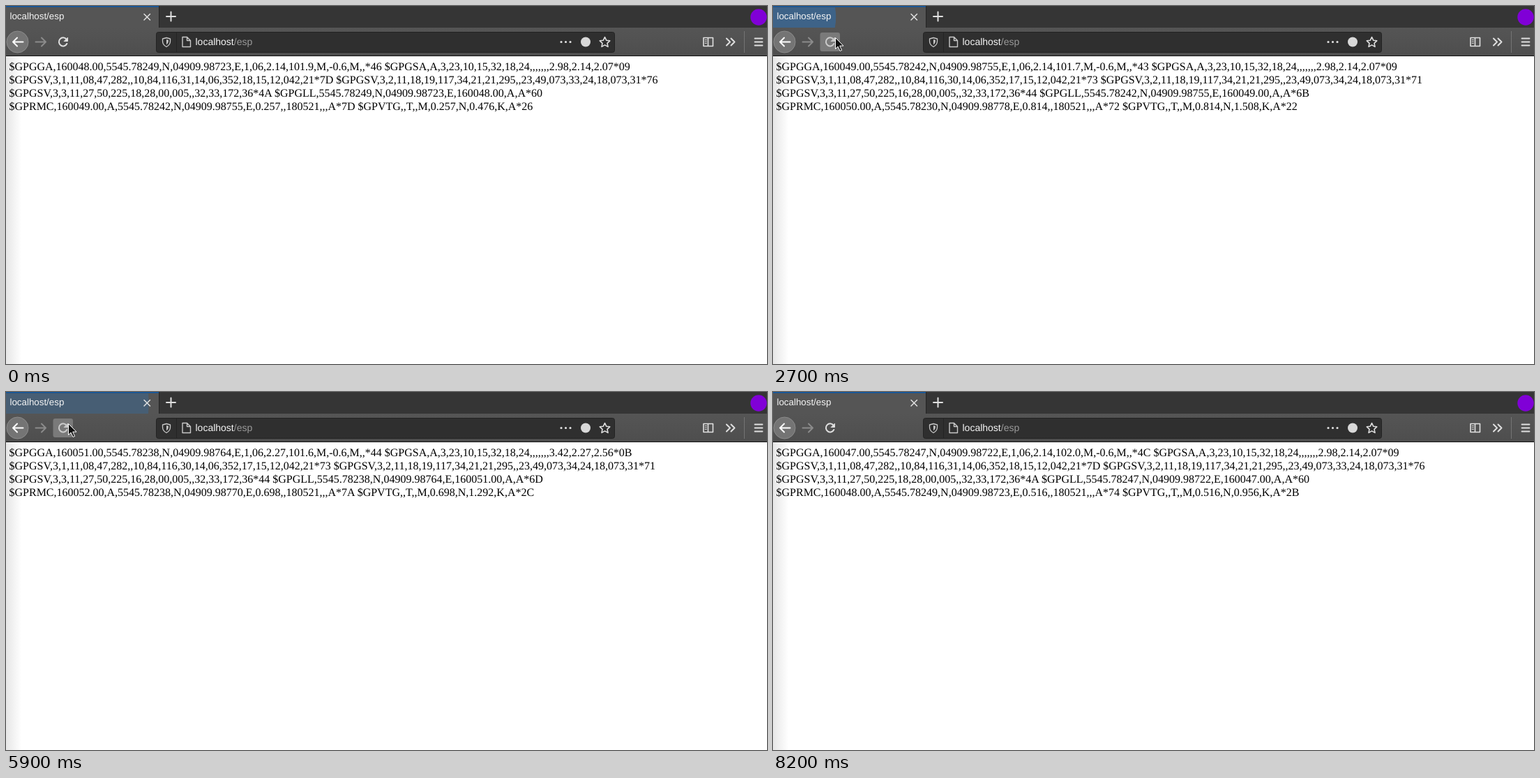
An HTML page for the animation above (8600 ms loop, 1091 by 513 pixels).

```html
<!DOCTYPE html>
<html lang="en">
<head>
<meta charset="utf-8">
<title>localhost/esp</title>
<style>
html, body { margin: 0; width: 100%; height: 100%; overflow: hidden; background: #fff; }
svg { display: block; width: 1091px; height: 513px; }
text { text-rendering: geometricPrecision; }
.ui { font-family: "Liberation Sans", Arial, sans-serif; fill: #f5f5f5; }
.page { font: 16px "Liberation Serif", "Times New Roman", serif; fill: #000; }
.icon { fill: none; stroke: #e0e0e0; stroke-width: 1.6; stroke-linecap: round; stroke-linejoin: round; }
</style>
</head>
<body>
<svg viewBox="0 0 1091 513">
  <defs>
    <linearGradient id="shade"><stop stop-color="#e6e6e6"/><stop offset="1" stop-color="#fff"/></linearGradient>
    <linearGradient id="bar" x2="0" y2="1"><stop stop-color="#555"/><stop offset="1" stop-color="#4e4e4e"/></linearGradient>
    <clipPath id="tab"><path d="M0 2H219V31H0z"/></clipPath>
  </defs>

  <!-- tab strip -->
  <path fill="#353535" d="M0 0H1091V31H0z"/>
  <path fill="#555" d="M0 0H219V31H0z"/>
  <path fill="#0a57a5" d="M0 0H219V1.5H0z"/>
  <path fill="#242424" d="M219 0h1v31h-1z"/>
  <circle id="burst" cx="14" cy="16" fill="#0a84ff" clip-path="url(#tab)"/>
  <text class="ui" x="5.5" y="19" font-size="13.33">localhost/esp</text>
  <circle cx="1079" cy="16" r="11.7" fill="#8000d7"/>

  <!-- toolbar -->
  <path fill="url(#bar)" d="M0 31H1091V71H0z"/>
  <path fill="#111" d="M0 71H1091V72H0z"/>
  <rect x="215.5" y="37.5" width="657" height="29" rx="3" fill="#2f2f2f" stroke="#232323"/>
  <path fill="#232323" d="M244 38h1v28h-1z"/>
  <text class="ui" x="271.5" y="56" font-size="14">localhost<tspan fill="#999">/esp</tspan></text>
  <rect id="button" x="67.5" y="38" width="28.5" height="27" rx="3"/>
  <circle cx="16.5" cy="51.5" r="15.5" fill="#747474" stroke="#8c8c8c"/>
  <path fill="#747474" d="M1058 36h1v31h-1z"/>

  <g class="icon">
    <path stroke-width="1.5" d="M198 11.5l8.5 8.5m0-8.5l-8.5 8.5"/>
    <path stroke-width="2" d="M236.5 8.5v13m-6.5-6.5h13"/>
    <path stroke="#fff" stroke-width="2" d="M24.5 51.5H10m6-6l-6 6 6 6"/>
    <path stroke="#8b8b8b" stroke-width="2" d="M42.5 51.5H57m-6-6l6 6-6 6"/>
    <g id="reload">
      <path stroke-width="2" d="M87.3 54A6 6 0 1 1 86.5 47.5"/>
      <path fill="#e0e0e0" stroke-width="1" d="M88.5 45.500v5h-5z"/>
    </g>
    <path stroke="#c8c8c8" stroke-width="1.3" d="M230 45.5l5.5 1.5v3.500q0 5-5.5 8-5.5-3-5.5-8v-3.500z"/>
    <path fill="#c8c8c8" stroke="none" d="M230 48l2.800 .8v1.700q0 3-2.800 5z"/>
    <path stroke="#c8c8c8" stroke-width="1.4" d="M253 44.5h6.5l5 5v9h-11.5zM259.5 44.5v5h5"/>
    <path stroke-width="3.2" d="M796 51.5h0m6.5 0h0m6.5 0h0"/>
    <path d="M858.5 44.5l2.200 4.700 5 .6-3.700 3.500 1 5.100-4.500-2.500-4.500 2.500 1-5.100-3.700-3.500 5-.6z"/>
    <path d="M1000 45.5h13.500v12h-13.500zM1006.500 45.500v12"/>
    <path stroke-width="1.200" d="M1002.300 48.500h2m-2 2.500h2m-2 2.500h2"/>
    <path stroke-width="2" d="M1033 46.500l5 5-5 5m6.500-10l5 5-5 5"/>
    <path stroke-width="1.800" d="M1073.500 46.500h11m-11 5h11m-11 5h11"/>
  </g>
  <circle cx="831" cy="51.5" r="7" fill="#d8d8d8"/>

  <!-- page -->
  <path fill="#fff" d="M0 72H1091V513H0z"/>
  <path fill="url(#shade)" d="M0 72H22V513H0z"/>
  <g class="page">
    <text x="4.5" y="92"/><text x="4.5" y="111"/><text x="4.5" y="130"/><text x="4.5" y="149"/>
  </g>
  <path id="cursor" d="M.5.5V16.500l3.600-3.400 2.900 6.400 2.600-1.100-2.900-6.300h5.300z" fill="#111" stroke="#fff"/>
</svg>
<script>
const LOOP = 8600;
const CLICKS = [2500, 4100, 5600, 7100];
const $ = id => document.getElementById(id);
const lines = document.querySelectorAll(".page text");

function ease(u) {
  u = Math.min(1, Math.max(0, u));
  return u * u * (3 - 2 * u);
}

// The receiver drifts a little every second
const lat = [247, 249, 242, 230, 238, 238];
const lon = [722, 723, 755, 778, 764, 770];
const kmh = [.956, .476, 1.508, .522, 1.292];

const clock = i => `1600${47 + i}.00`;
const place = i => `5545.78${lat[i]},N,04909.98${lon[i]},E`;

// NMEA sentence with its XOR checksum
function sentence(body) {
  const sum = [...body].reduce((x, c) => x ^ c.charCodeAt(0), 0);
  return `$${body}*${sum.toString(16).toUpperCase().padStart(2, "0")}`;
}

function report(i) {
  const knots = (kmh[i] / 1.852).toFixed(3);
  const alt = (102 - .4 * ease(i / 3)).toFixed(1);
  const [pdop, hdop, vdop] = i < 4 ? ["2.98", "2.14", "2.07"] : ["3.42", "2.27", "2.56"];
  // Signal levels swing together around the fourth fix
  const swing = Math.exp(-1.2 * (i - 3) ** 2);
  const snr = (base, gain) => Math.floor(base + gain * swing);
  return [
    [`GPGGA,${clock(i)},${place(i)},1,06,${hdop},${alt},M,-0.6,M,,`,
     `GPGSA,A,3,23,10,15,32,18,24,,,,,,,${pdop},${hdop},${vdop}`],
    [`GPGSV,3,1,11,08,47,282,,10,84,116,${snr(31.2, -2)},14,06,352,${snr(18.1, -1)},15,12,042,${snr(21.5, -1)}`,
     `GPGSV,3,2,11,18,19,117,${snr(34, 2)},21,21,295,,23,49,073,${snr(33.2, 3)},24,18,073,${snr(31, 3)}`],
    [`GPGSV,3,3,11,27,50,225,${snr(18.1, -4)},28,00,005,,32,33,172,${snr(36, 1)}`,
     `GPGLL,${place(i)},${clock(i)},A,A`],
    [`GPRMC,${clock(i + 1)},A,${place(i + 1)},${knots},,180521,,,A`,
     `GPVTG,,T,,M,${knots},N,${kmh[i].toFixed(3)},K,A`]
  ].map(pair => pair.map(sentence).join(" "));
}

// Pointer stops: time, x, y
const stops = [
  [300, 0, 63], [600, 328, 134], [800, 328, 134], [1200, 275, 64], [1500, 535, 172],
  [1700, 334, 116], [2100, 89, 45], [7800, 89, 45], [8200, 84, -24]
];

function pointer(t) {
  const k = stops.findIndex(s => s[0] > t);
  if (k < 1) return [0, -40];
  const [t0, x0, y0] = stops[k - 1], [t1, x1, y1] = stops[k];
  const u = ease((t - t0) / (t1 - t0));
  return [x0 + (x1 - x0) * u, y0 + (y1 - y0) * u].map(Math.round);
}

function draw(now) {
  const t = Math.floor(now % LOOP / 100) * 100; // ten pictures a second
  const [x, y] = pointer(t);
  $("cursor").setAttribute("transform", `translate(${x} ${y})`);

  const age = t - Math.max(-LOOP, ...CLICKS.filter(c => c <= t));
  const hover = x > 67 && x < 96 && y > 38 && y < 65;
  $("button").setAttribute("fill", !hover ? "none" : age < 100 ? "#929292" : "#7a7a7a");
  $("reload").setAttribute("opacity", hover && age < 400 ? .8 : 1);

  const bursting = age >= 100 && age < 400;
  $("burst").setAttribute("r", bursting ? 12.2 * 2.5 ** (age / 100) : 0);
  $("burst").setAttribute("opacity", .12 * (4.5 - age / 100));

  const loads = CLICKS.filter(c => t >= c + 100).length;
  report((1 + loads) % 5).forEach((s, n) => {
    if (lines[n].textContent !== s) lines[n].textContent = s;
  });
  requestAnimationFrame(draw);
}
draw(0);
</script>
</body>
</html>
```
